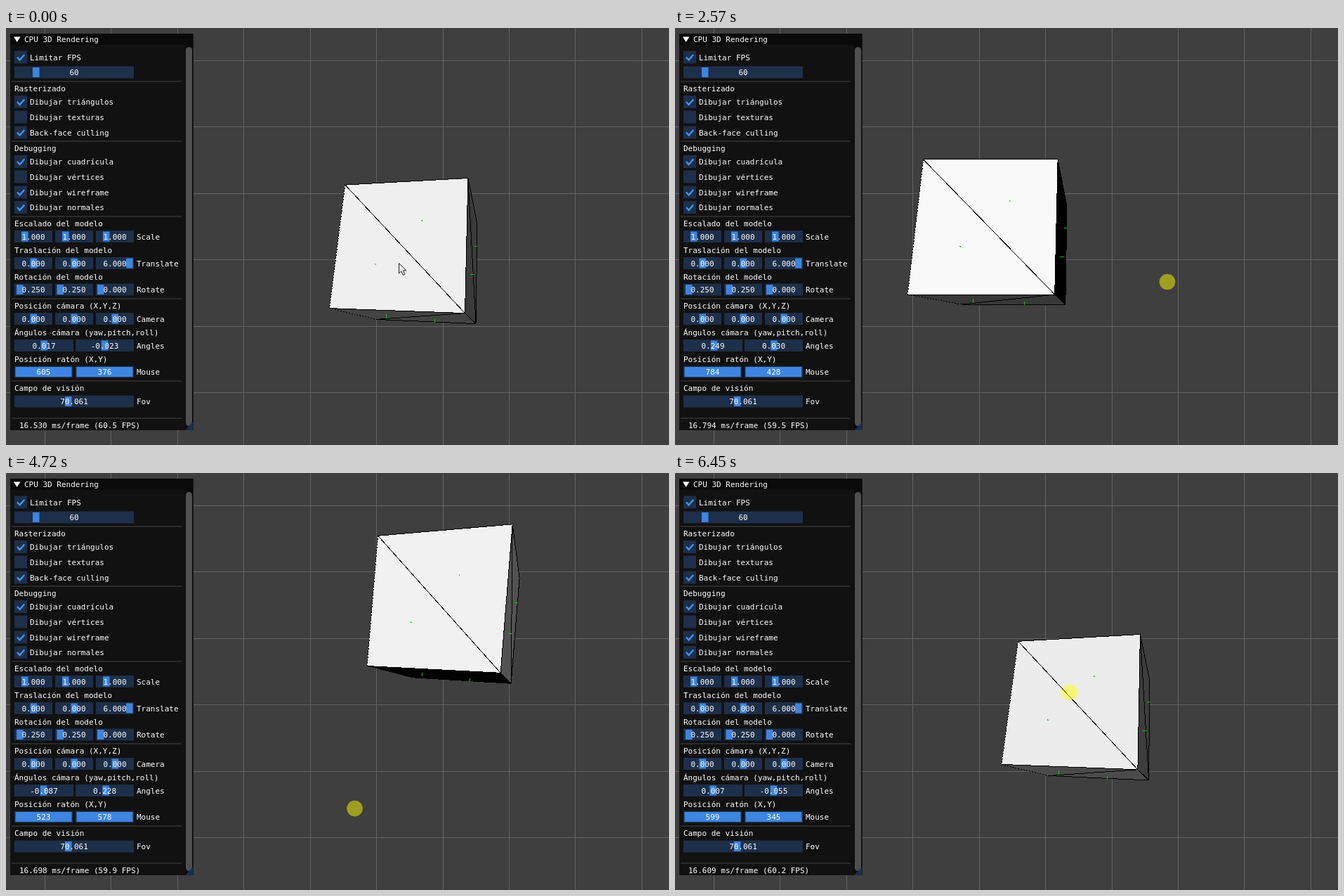
These frames come from a looping animation (944x593 px, 6.54 s). An HTML page:

```html
<!DOCTYPE html>
<html lang="es">
<head>
<meta charset="utf-8">
<title>CPU 3D Rendering</title>
<style>
  html, body { margin: 0; width: 100%; height: 100%; overflow: hidden; background: #3f3f3f; }
  svg { display: block; width: 944px; height: 593px; }
  text { font: 11px "DejaVu Sans Mono", "Liberation Mono", monospace; fill: #fff; white-space: pre; }
  .mid { text-anchor: middle; }
  .crisp { shape-rendering: crispEdges; }
</style>
</head>
<body>
<svg id="stage" viewBox="0 0 944 593"></svg>
<script>
const stage = document.getElementById('stage');
const LOOP = 6540;
const FRAME = '#1d2f49', GRAB = '#3d85e0', MARK = '#4296fa';

function add(tag, attrs, parent = stage) {
  const el = document.createElementNS('http://www.w3.org/2000/svg', tag);
  set(el, attrs);
  parent.appendChild(el);
  return el;
}
function set(el, attrs) {
  for (const k in attrs) el.setAttribute(k, attrs[k]);
}
function rect(x, y, width, height, fill, parent = stage) {
  return add('rect', { x, y, width, height, fill }, parent);
}
function label(x, y, str, cls = '') {
  const el = add('text', { x, y: y + 4, class: cls });
  el.textContent = str;
  return el;
}

// Background grid
rect(0, 0, 944, 593, '#3f3f3f');
let grid = '';
for (let i = 0; i < 10; i++) grid += `M${Math.floor(55.3 + 94.45 * i) + .5} 0V593`;
for (let i = 0; i < 6; i++) grid += `M0 ${Math.floor(46.2 + 94.45 * i) + .5}H944`;
add('path', { d: grid, stroke: '#636363', fill: 'none', class: 'crisp' });

// Cube: corners are addressed by their signs along x, y and z
const FOCAL = 484, CENTER = [591, 318], DEPTH = 6, TURN = 0.25;
const cubeLayer = add('g', { class: 'crisp' });

function rotateModel([x, y, z]) {
  const s = Math.sin(TURN), c = Math.cos(TURN);
  const y1 = y * c - z * s, z1 = y * s + z * c;
  return [x * c + z1 * s, y1, z1 * c - x * s];
}
function toCamera([x, y, z], yaw, pitch) {
  const x1 = x * Math.cos(yaw) - z * Math.sin(yaw);
  const z1 = x * Math.sin(yaw) + z * Math.cos(yaw);
  return [x1, y * Math.cos(pitch) + z1 * Math.sin(pitch),
          z1 * Math.cos(pitch) - y * Math.sin(pitch)];
}
function project(p, yaw, pitch) {
  const [x, y, z] = toCamera([p[0], p[1], p[2] + DEPTH], yaw, pitch);
  return [CENTER[0] + FOCAL * x / z, CENTER[1] - FOCAL * y / z];
}

const FTL = [-1, 1, -1], FTR = [1, 1, -1], FBR = [1, -1, -1], FBL = [-1, -1, -1];
const BTR = [1, 1, 1], BBR = [1, -1, 1], BBL = [-1, -1, 1];
const faces = [
  { normal: [0, -1, 0], tris: [[FBR, BBL, FBL], [FBR, BBR, BBL]] },
  { normal: [1, 0, 0], tris: [[FTR, BTR, BBR], [FTR, BBR, FBR]] },
  { normal: [0, 0, -1], tris: [[FTL, FTR, FBR], [FTL, FBR, FBL]] }
].map(f => ({
  normal: rotateModel(f.normal),
  tris: f.tris.map(t => t.map(rotateModel)),
  fill: add('path', {}, cubeLayer)
}));
const solidEdges = [[FTL, FTR], [FTR, FBR], [FBR, FBL], [FTL, FBR], [FTR, BTR], [BTR, BBR],
  [BBR, FBR], [FTR, BBR], [BBR, BBL], [FBR, BBL]].map(e => e.map(rotateModel));
const backEdges = [[FBL, BBL], [FTL, FBL]].map(e => e.map(rotateModel));
const wire = add('path', { stroke: '#000', fill: 'none' }, cubeLayer);
const dotted = add('path', { stroke: '#000', fill: 'none', 'stroke-dasharray': '2 2' }, cubeLayer);
const ticks = add('path', { stroke: '#0c0', fill: 'none' }, cubeLayer);

function drawCube(yaw, pitch) {
  const at = p => project(p, yaw, pitch).map(v => v.toFixed(1)).join(' ');
  const line = ([a, b]) => `M${at(a)}L${at(b)}`;
  let tickPath = '';
  for (const f of faces) {
    const light = Math.max(0, -toCamera(f.normal, yaw, pitch)[2]);
    const g = Math.round(255 * light);
    set(f.fill, { d: f.tris.map(t => `M${t.map(at).join('L')}Z`).join(''), fill: `rgb(${g},${g},${g})` });
    for (const t of f.tris) {
      const mid = [0, 1, 2].map(i => (t[0][i] + t[1][i] + t[2][i]) / 3);
      tickPath += line([mid, mid.map((v, i) => v + f.normal[i] * .06)]);
    }
  }
  wire.setAttribute('d', solidEdges.map(line).join(''));
  dotted.setAttribute('d', backEdges.map(line).join(''));
  ticks.setAttribute('d', tickPath);
}

// Panel
add('rect', { x: 6, y: 8, width: 260.5, height: 564, fill: '#111' });
rect(6, 8, 260.5, 16, '#0a0a0a');
rect(255, 24, 11.5, 548, '#0b0b0b');
add('rect', { x: 256, y: 27, width: 9, height: 539, rx: 4.5, fill: '#4f4f4f' });
add('path', { d: 'M266.5 560V572H255Z', fill: '#1a2f4d' });
add('path', { d: 'M11 12.5H20.5L15.7 20Z', fill: '#fff' });
label(26, 16, 'CPU 3D Rendering');

for (const y of [76, 161, 268, 385, 502, 555]) rect(8, y - .5, 242, 1, '#454549');

function checkbox(y, str, on) {
  rect(12, y - 9, 18, 18, FRAME);
  if (on) add('path', { d: `M16 ${y}l3.6 4 6.6-7.4`, stroke: MARK, 'stroke-width': 2.3, fill: 'none' });
  label(34, y, str);
}
checkbox(41.5, 'Limitar FPS', true);
checkbox(105, 'Dibujar triángulos', true);
checkbox(126.5, 'Dibujar texturas', false);
checkbox(148.5, 'Back-face culling', true);
checkbox(190, 'Dibujar cuadrícula', true);
checkbox(211.5, 'Dibujar vértices', false);
checkbox(233.5, 'Dibujar wireframe', true);
checkbox(255, 'Dibujar normales', true);

[[86, 'Rasterizado'], [171, 'Debugging'], [278, 'Escalado del modelo'],
 [316, 'Traslación del modelo'], [353.5, 'Rotación del modelo'], [395, 'Posición cámara (X,Y,Z)'],
 [433, 'Ángulos cámara (yaw,pitch,roll)'], [470.5, 'Posición ratón (X,Y)'],
 [512, 'Campo de visión']].forEach(([y, s]) => label(12, y, s));

function slider(x, y, width, grabX, str, grabWidth = 9.5) {
  rect(x, y - 8.5, width, 17, FRAME);
  const grab = rect(grabX, y - 7, grabWidth, 14, GRAB);
  return { grab, text: label(x + width / 2, y, str, 'mid') };
}
function triple(y, name, values, grabs) {
  values.forEach((v, i) => slider(12 + 58 * i, y, 54, grabs[i], v));
  label(186, y, name);
}
slider(12, 63, 170, 38, '60');
triple(296.5, 'Scale', ['1.000', '1.000', '1.000'], [22, 80, 138]);
triple(334.5, 'Translate', ['0.000', '0.000', '6.000'], [34.5, 92.5, 171]);
triple(372, 'Rotate', ['0.250', '0.250', '0.000'], [15, 72.5, 130]);
triple(413.5, 'Camera', ['0.000', '0.000', '0.000'], [34.5, 92.5, 150.5]);
const yawSlider = slider(12, 451.5, 84, 49.5, '');
const pitchSlider = slider(99, 451.5, 83, 136, '');
label(186, 451.5, 'Angles');
const mouseX = slider(12, 489, 83, 13.5, '', 80).text;
const mouseY = slider(99, 489, 83, 100.5, '', 80).text;
label(186, 489, 'Mouse');
slider(12, 531, 170, 84, '70.061');
label(186, 531, 'Fov');
const stats = label(19, 565, '');

// Pointer
const arrow = add('path', {
  d: 'M.5 .5v14.5l3.4-3.2 2.3 5.6 2.7-1.1-2.4-5.4h4.6Z',
  fill: '#e8e8e8', stroke: '#222'
});
const halo = add('circle', { r: 11.3, fill: '#ff0', 'fill-opacity': .5 });

// step, yaw, pitch, pointer x/y, mouse x/y, frame ms (the last five are derived when left out)
const keys = [
  [0, .017, -.023, 559, 334, 605, 376, 16.53],
  [6, .016, -.025, 559, 333, 605, 375, 16.6],
  [9, .006, -.027, 552, 332, 592, 373, 16.65],
  [14, -.133, -.025, 469, 332, 495, 375, 16.714],
  [17.5, -.213, -.033],
  [21, -.14, -.028],
  [25, .04, -.01],
  [31, .249, .03, 701, 361, 784, 428, 16.794],
  [34, .311, .038],
  [38, .25, -.14],
  [42, .126, -.301, 611, 173, 707, 155, 16.679],
  [43, .075, -.316],
  [46, -.18, -.28],
  [50, -.366, -.123, 340, 287, 296, 286, 16.554],
  [54, -.27, .12],
  [58, -.02, .245],
  [61, .18, .19],
  [64, .314, .082, 741, 384, 848, 469, 16.468],
  [66, .331, .015],
  [70, .24, -.16],
  [74, .07, -.165],
  [76, .012, -.1],
  [78, .007, -.055, 562, 312, 599, 345, 16.609]
].map(k => k.length > 3 ? k : [...k, 550 + 610 * k[1], 346 + 575 * k[2],
  593 + 800 * k[1], 395 + 800 * k[2], 16.63 + .12 * Math.sin(k[0] * 2.3)]);

function sample(step) {
  let i = 0;
  while (i < keys.length - 2 && step >= keys[i + 1][0]) i++;
  const a = keys[i], b = keys[i + 1];
  const before = keys[Math.max(0, i - 1)], after = keys[Math.min(keys.length - 1, i + 2)];
  const span = b[0] - a[0], u = Math.min(1, (step - a[0]) / span);
  return a.map((v, n) => {
    const m0 = (b[n] - before[n]) / (b[0] - before[0]) * span;
    const m1 = (after[n] - v) / (after[0] - a[0]) * span;
    return v + u * (m0 + u * (3 * (b[n] - v) - 2 * m0 - m1 + u * (2 * (v - b[n]) + m0 + m1)));
  });
}

const pace = [[0, 0], [9, 730], [17, 1390], [26, 2150], [78, 6450]];
function stepAt(ms) {
  let i = 0;
  while (i < pace.length - 2 && ms >= pace[i + 1][1]) i++;
  const [s0, t0] = pace[i], [s1, t1] = pace[i + 1];
  return Math.min(78, Math.floor(s0 + (ms - t0) / (t1 - t0) * (s1 - s0)));
}

let shown = -1;
function render(ms) {
  const step = stepAt(ms + 4);
  if (step === shown) return;
  shown = step;
  const [, yaw, pitch, px, py, mx, my, cost] = sample(step);
  drawCube(yaw, pitch);
  yawSlider.grab.setAttribute('x', 49.3 + 5.9 * yaw);
  pitchSlider.grab.setAttribute('x', 136 + 5.9 * pitch);
  yawSlider.text.textContent = yaw.toFixed(3);
  pitchSlider.text.textContent = pitch.toFixed(3);
  mouseX.textContent = Math.round(mx);
  mouseY.textContent = Math.round(my);
  stats.textContent = `${cost.toFixed(3)} ms/frame (${(1000 / cost).toFixed(1)} FPS)`;
  const pressed = step >= 4;
  set(arrow, { transform: `translate(${px} ${py})`, visibility: pressed ? 'hidden' : 'visible' });
  set(halo, { cx: px, cy: py, visibility: pressed ? 'visible' : 'hidden' });
}

const start = performance.now();
function tick() {
  render((performance.now() - start) % LOOP);
  requestAnimationFrame(tick);
}
tick();
</script>
</body>
</html>
```
